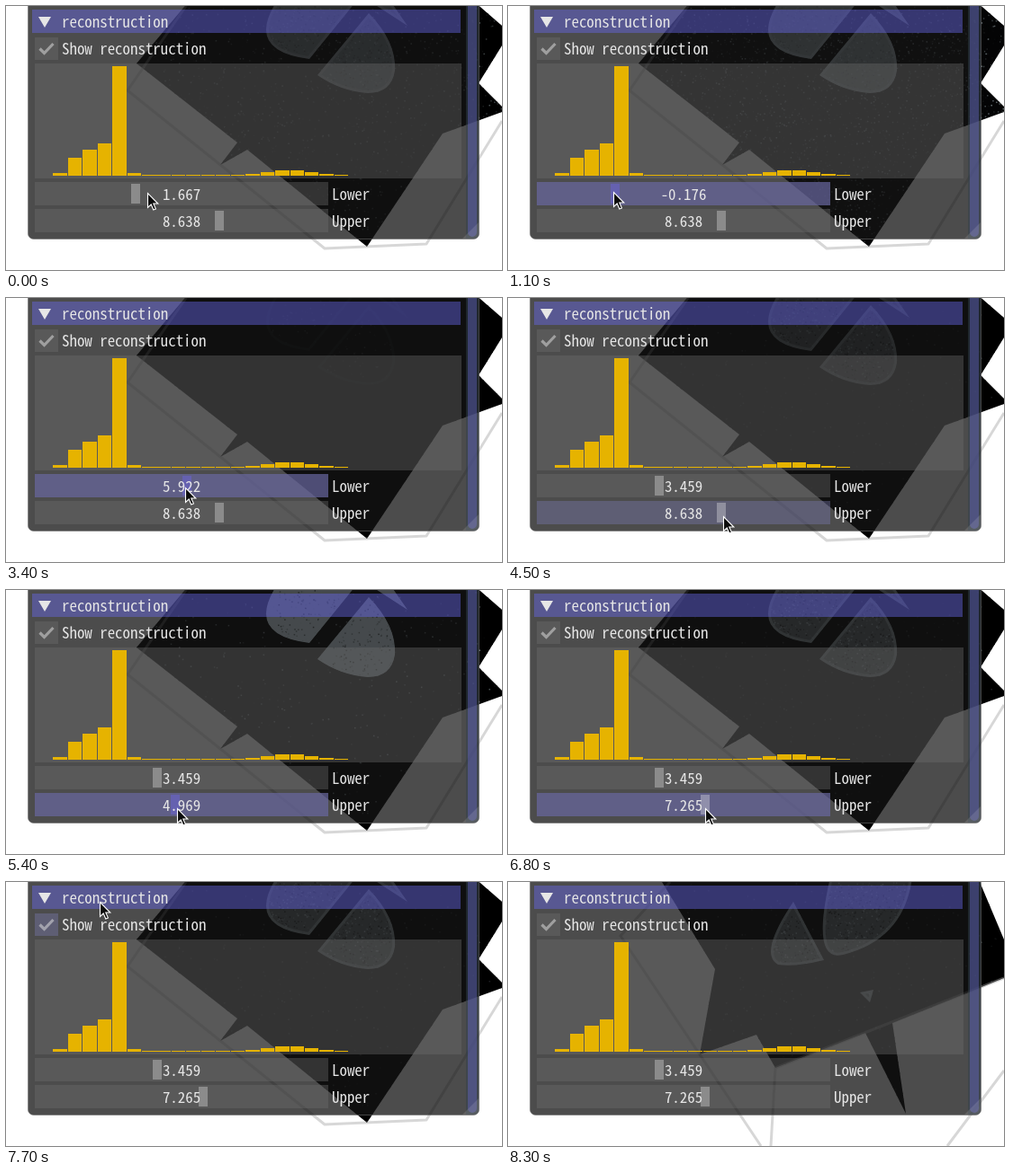
An HTML page with a canvas that plays this animation: 551x294 px, repeating every 8500 ms.

```html
<!DOCTYPE html>
<html lang="en">
<head>
<meta charset="utf-8">
<title>Reconstruction window</title>
<style>
html, body { margin: 0; width: 100%; height: 100%; overflow: hidden; background: #fff; }
canvas, svg { position: absolute; left: 0; top: 0; width: 551px; height: 294px; }
text { fill: #e6e6e6; font: 16.9px "Noto Sans Mono CJK JP", "Noto Sans Mono", monospace; white-space: pre; }
.frame { fill: rgba(110,110,110,.39); }
.hover { fill: rgba(120,120,176,.4); }
.active { fill: rgba(107,105,163,.69); }
.grab { fill: rgba(255,255,255,.3); }
.grab.on { fill: rgba(105,99,204,.6); }
#header { fill: rgba(102,102,230,.45); }
#header.hover { fill: rgba(115,115,230,.6); }
</style>
</head>
<body>
<canvas id="scene" width="551" height="294"></canvas>
<svg viewBox="0 0 551 294">
  <rect x="24.5" y="-20" width="501" height="279.5" rx="6" fill="rgba(20,20,20,.76)" stroke="rgba(110,110,110,.6)"/>
  <path d="M511 0H525V253Q525 259 519 259H511Z" fill="rgba(51,64,77,.5)"/>
  <rect x="513" y="-10" width="10" height="267" rx="5" fill="rgba(102,102,204,.4)"/>
  <path d="M525 241V253Q525 259 519 259H507Z" fill="rgba(255,255,255,.12)"/>
  <rect id="header" x="29" y="4" width="476" height="26"/>
  <path d="M36 12H50L43 24Z" fill="#e6e6e6"/>
  <text x="62" y="24">reconstruction</text>
  <rect id="check" class="frame" x="32" y="35" width="26" height="25"/>
  <path d="M37.5 47.5L42.5 52.5L52.5 42" fill="none" stroke="rgba(230,230,230,.5)" stroke-width="3.2"/>
  <text x="62" y="54">Show reconstruction</text>
  <rect class="frame" x="32" y="64" width="474" height="128"/>
  <g id="bars" fill="#e6b300" shape-rendering="crispEdges"></g>
  <rect id="lowerBar" x="32" y="196" width="326" height="26"/>
  <rect id="lowerGrab" y="198" width="10" height="22"/>
  <text id="lowerText" x="195" y="216" text-anchor="middle"></text>
  <text x="362" y="216">Lower</text>
  <rect id="upperBar" x="32" y="226" width="326" height="26"/>
  <rect id="upperGrab" y="228" width="10" height="22"/>
  <text id="upperText" x="195" y="246" text-anchor="middle"></text>
  <text x="362" y="246">Upper</text>
  <path id="cursor" d="M.5 .5V16.5L4.2 13L6.8 19L9.4 17.9L6.8 12H11.8Z" fill="#0c0c0c" stroke="#fff" stroke-width="1.1"/>
</svg>
<script>
const LOOP = 8500, STEP = 100, W = 551, H = 294;
const $ = id => document.getElementById(id);
const ctx = $("scene").getContext("2d");

const mix = (a, b, p) => a + (b - a) * p;
const span = (t, a, b) => Math.max(0, Math.min(1, (t - a) / (b - a)));
const within = (t, a, b) => t >= a && t <= b;
const easeOut = (p, k) => 1 - (1 - p) ** k;

// Use the half-width monospace if present, else one of equal advance.
ctx.font = '100px "Noto Sans Mono CJK JP", "Noto Sans Mono", monospace';
if (ctx.measureText("0").width > 55) {
  document.querySelectorAll("text").forEach(el => el.style.fontSize = "14px");
}

// Each slider is dragged past its goal, then back.
function lowerAt(t) {
  const out = mix(1.667, -2.94175, span(t, 700, 1700));
  const up = mix(out, 5.922, span(t, 1700, 2700));
  return mix(up, 3.459, span(t, 3400, 4000));
}

function upperAt(t) {
  return mix(mix(8.638, 4.05, span(t, 4700, 5100)), 7.265, span(t, 5200, 5900));
}

const gripX = value => 121.6 + value * 13.41;

// The pointer runs slightly ahead of the grip while dragging.
function cursorAt(t) {
  const ahead = t + 35;
  if (t < 700) return [mix(157, 144, easeOut(span(t, 0, 500), 2)), 208];
  if (t < 4000) return [gripX(lowerAt(ahead)), mix(207, 211, span(t, 1900, 2700))];
  if (t < 4600) {
    const p = span(t, 4000, 4500);
    return [mix(168, 239, p), mix(211, 243, p)];
  }
  if (t < 7100) return [gripX(upperAt(ahead)), 243];
  const p = easeOut(span(t, 7100, 8000), 1.77);
  return [mix(218, 85, p), mix(243, -15, p)];
}

// A ramp, one peak and a low bell.
function barHeight(i) {
  if (i < 4) return 3 + 33 * (i / 3) ** .6;
  if (i === 4) return 122;
  if (i === 5) return 3;
  return 1 + 5.5 * Math.exp(-(((i - 15.6) / 1.3) ** 2) / 2);
}
$("bars").innerHTML = Array.from({ length: 20 }, (_, i) => {
  const h = Math.round(barHeight(i));
  return `<rect x="${52.3 + i * 16.45}" y="${189 - h}" width="15.5" height="${h}"/>`;
}).join("");

const makeView = (body, wire, ...tissue) => ({
  body: new Path2D(body),
  wire: new Path2D(wire),
  tissue: tissue.map(d => new Path2D(d))
});

const front = makeView(
  "M203 -5L145 64L257 152L238 177L268 160L401 268L485 142L551 118V112L525 86L551 44V22L520 -5Z",
  "M200 0L135 94L354 270L467 265L551 128",
  "M300 -4Q266 50 337 59L388 -4Z",
  "M403 8Q434 40 432 72Q428 97 402 97Q372 95 346 77Z",
  "M406 -4L446 22L428 -4Z");

const turned = makeView(
  "M168 -5L230 97L213 192L276 170L297 207L397 168L442 258L427 157L551 107V64L522 -5Z",
  "M180 0L125 60L281 294M292 294L297 207L551 107M551 210L488 294",
  "M317 22Q278 80 300 92Q318 95 351 87Z",
  "M358 -5Q336 90 372 81Q440 64 449 -5Z",
  "M391 123L406 120L402 134Z");

function random(seed) {
  return () => (seed = (seed * 16807) % 2147483647) / 2147483647;
}

// Maps a density to a tint inside the lower..upper window.
function shade(level, lower, upper) {
  const k = span(level, lower, upper);
  return `rgb(${225 * k | 0},${245 * k | 0},${255 * k | 0})`;
}

function speckle(area, seed, count, level, tint) {
  const rnd = random(seed);
  ctx.save();
  ctx.clip(area);
  for (let i = 0; i < count; i++) {
    ctx.fillStyle = tint(level(rnd()));
    ctx.fillRect(rnd() * W, rnd() * H, 1.5, 1.5);
  }
  ctx.restore();
}

function drawScene(view, lower, upper) {
  const tint = level => shade(level, lower, upper);
  ctx.fillStyle = "#fff";
  ctx.fillRect(0, 0, W, H);
  ctx.fillStyle = tint(0);
  ctx.fill(view.body);
  speckle(view.body, 17, 9000, r => 4.4 * r ** 3, tint);

  ctx.save();
  ctx.clip(view.body);
  view.tissue.forEach((part, n) => {
    ctx.save();
    ctx.clip(part);
    ctx.fillStyle = tint(5.1);
    ctx.fill(part);
    speckle(part, 71 + n, 12000, r => 4 + 2.4 * r, tint);
    ctx.strokeStyle = tint(6.1);
    ctx.lineWidth = 6;
    ctx.globalAlpha = .7;
    ctx.stroke(part);
    ctx.restore();
  });
  ctx.restore();

  ctx.strokeStyle = "rgba(160,160,160,.42)";
  ctx.lineWidth = 3;
  ctx.lineJoin = "round";
  ctx.stroke(view.wire);
}

function setSlider(name, value, state, held) {
  $(name + "Bar").setAttribute("class", state);
  $(name + "Grab").setAttribute("class", held ? "grab on" : "grab");
  $(name + "Grab").setAttribute("x", Math.round(gripX(value) - 5));
  $(name + "Text").textContent = value.toFixed(3);
}

function render(t) {
  const lower = lowerAt(t), upper = upperAt(t);
  const [x, y] = cursorAt(t);

  drawScene(t < 8300 ? front : turned, lower, upper);
  setSlider("lower", lower,
    within(t, 800, 4000) ? "active" : t === 4100 ? "hover" : "frame",
    within(t, 800, 3900));
  setSlider("upper", upper,
    within(t, 4700, 6800) ? "active" : within(t, 4300, 7100) ? "hover" : "frame",
    within(t, 4700, 6700));
  $("check").setAttribute("class", within(t, 7600, 7700) ? "hover" : "frame");
  $("header").setAttribute("class", t === 7800 ? "hover" : "");
  $("cursor").setAttribute("transform", `translate(${Math.round(x)} ${Math.round(y)})`);
  $("cursor").setAttribute("opacity", t < 8100 ? 1 : 0);
}

let start, last = -1;
function tick(now) {
  start ??= now;
  const t = Math.floor((now - start) % LOOP / STEP) * STEP;
  if (t !== last) render(last = t);
  requestAnimationFrame(tick);
}
render(0);
requestAnimationFrame(tick);
</script>
</body>
</html>
```
